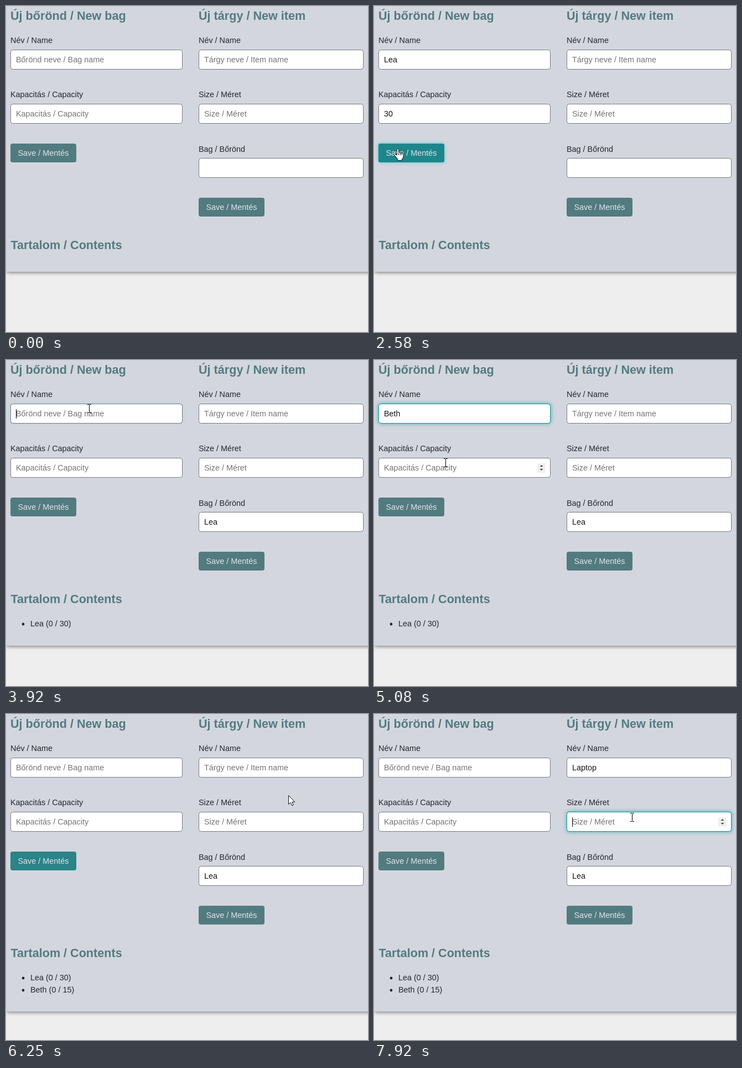
Recreate the animation shown at these times as an HTML page with a canvas. Size 654 px wide and 590 px high, loop 8 s.

```html
<!DOCTYPE html>
<html lang="hu">
<head>
<meta charset="utf-8">
<title>Bags and items</title>
<style>
  html, body { margin: 0; width: 100%; height: 100%; overflow: hidden; background: #eee; }
  canvas { display: block; width: 654px; height: 590px; }
</style>
</head>
<body>
<canvas id="stage" width="654" height="590"></canvas>
<script>
const ctx = document.getElementById('stage').getContext('2d');
const LOOP = 8000, FPS = 12;
const FAMILY = '"Liberation Sans", Arial, sans-serif';
const BODY = `14.4px ${FAMILY}`, HEAD = `bold 21.6px ${FAMILY}`;
const INK = '#23272d', TEAL = [82, 123, 128], BRIGHT = [30, 134, 139];
const BAG_A = 'Lea', BAG_B = 'Beth';
const SAVED_A = 2670, SAVED_B = 5920;

// One visit to a field: focus span, reset time, and typing
const visit = (from, to, clear, text = '', start = 0, step = 0) =>
  ({ from, to, clear, text, start, step });

const fields = [
  { x: 8, y: 79, w: 311, label: 'Név / Name', hint: 'Bőrönd neve / Bag name', visits: [
    visit(660, 2050, SAVED_A, BAG_A, 1400, 140),
    visit(3900, 5200, SAVED_B, BAG_B, 4100, 143)] },
  { x: 8, y: 177, w: 311, label: 'Kapacitás / Capacity', hint: 'Kapacitás / Capacity', number: true, visits: [
    visit(2050, 2420, SAVED_A, '30', 2190, 110),
    visit(5200, 5800, SAVED_B, '15', 5390, 120)] },
  { x: 348, y: 79, w: 298, label: 'Név / Name', hint: 'Tárgy neve / Item name', visits: [
    visit(6540, 7740, LOOP, 'Laptop', 6790, 115)] },
  { x: 348, y: 177, w: 298, label: 'Size / Méret', hint: 'Size / Méret', number: true, visits: [
    visit(7740, LOOP, LOOP)] }
];

const buttons = [
  { x: 8, y: 249, hovers: [[2330, 2860], [5690, 6210]], presses: [[2410, 2700], [5790, 5940]] },
  { x: 348, y: 347, hovers: [], presses: [] }
];

// Pointer path: time, x, y
const path = [
  [480, 215, -20], [640, 149, 87], [1750, 149, 87], [1950, 122, 190],
  [2250, 122, 190], [2420, 43, 258], [2800, 43, 258], [3400, 438, 277],
  [3560, 438, 277], [3860, 150, 88], [4880, 150, 88], [5080, 129, 186],
  [5560, 129, 186], [5740, 43, 258], [6160, 43, 258], [6250, 510, 147],
  [6430, 466, 90], [7400, 466, 90], [7640, 466, 187], [LOOP, 466, 187]
];

const clamp = v => Math.max(0, Math.min(1, v));
const fade = (t, from, to) => clamp((t - from) / 150) - clamp((t - to) / 150);
const fadeAny = (t, spans) => Math.max(0, ...spans.map(([a, b]) => fade(t, a, b)));
const mix = (a, b, k) => `rgb(${a.map((v, i) => Math.round(v + (b[i] - v) * k))})`;
const inside = (p, x, y, w, h) => p && p.x >= x && p.x < x + w && p.y >= y && p.y < y + h;

function pointerAt(t) {
  if (t < path[0][0]) return null;
  const i = path.findIndex(k => k[0] > t);
  const [t0, x0, y0] = path[i - 1], [t1, x1, y1] = path[i];
  const u = (t - t0) / (t1 - t0), e = u * u * (3 - 2 * u);
  return { x: Math.round(x0 + (x1 - x0) * e), y: Math.round(y0 + (y1 - y0) * e) };
}

function text(str, x, y, color = INK, font = BODY) {
  ctx.font = font;
  ctx.fillStyle = color;
  ctx.fillText(str, x, y);
}

function box(x, y, w, h, r, fill, stroke) {
  ctx.beginPath();
  ctx.roundRect(x, y, w, h, r);
  ctx.fillStyle = fill;
  ctx.fill();
  if (stroke) {
    ctx.strokeStyle = stroke;
    ctx.lineWidth = 1;
    ctx.stroke();
  }
}

function shadowed(color, blur, dx, dy, draw) {
  ctx.save();
  ctx.shadowColor = color;
  ctx.shadowBlur = blur;
  ctx.shadowOffsetX = dx;
  ctx.shadowOffsetY = dy;
  draw();
  ctx.restore();
}

function polygon(points, fill, stroke) {
  ctx.beginPath();
  points.forEach(([x, y]) => ctx.lineTo(x, y));
  ctx.closePath();
  ctx.fillStyle = fill;
  ctx.fill();
  if (stroke) {
    ctx.strokeStyle = stroke;
    ctx.stroke();
  }
}

function inputBox(x, y, w, glow) {
  const draw = () => box(x + .5, y + .5, w - 1, 35, 4, '#fff', mix([116, 123, 132], [28, 148, 150], glow));
  if (glow > 0) shadowed(`rgba(20,165,172,${.8 * glow})`, 6, 0, 0, draw);
  draw();
}

function spinner(x, y) {
  box(x - 7, y - 8, 15, 17, 1, '#f0f0f0');
  for (const s of [-1, 1])
    polygon([[x - 2.5, y + s * 2], [x + 3.5, y + s * 2], [x + .5, y + s * 5]], '#444');
}

function drawField(f, t, p) {
  const spans = f.visits.map(v => [v.from, v.to]);
  inputBox(f.x, f.y, f.w, fadeAny(t, spans));
  text(f.label, f.x, f.y - 12);

  const v = f.visits.find(v => t >= v.from && t < v.clear);
  const typed = v && v.text && t >= v.start
    ? Math.min(v.text.length, Math.floor((t - v.start) / v.step) + 1) : 0;
  const value = typed ? v.text.slice(0, typed) : '';
  text(value || f.hint, f.x + 10, f.y + 23, value ? '#14171b' : '#757575');

  const focused = v && t < v.to;
  if (focused) {
    const last = typed ? v.start + (typed - 1) * v.step : v.from;
    if ((t - last) % 1000 < 500) {
      ctx.fillStyle = '#000';
      ctx.fillRect(Math.round(f.x + 10 + ctx.measureText(value).width), f.y + 10, 1, 17);
    }
  }
  if (f.number && (focused || inside(p, f.x, f.y, f.w, 36))) spinner(f.x + f.w - 17, f.y + 18);
}

function drawButton(b, t) {
  const color = mix(TEAL, BRIGHT, fadeAny(t, b.hovers));
  const press = fadeAny(t, b.presses);
  const draw = () => box(b.x, b.y, 119, 34, 4, color);
  if (press > 0) shadowed(`rgba(40,200,215,${.75 * press})`, 6, 0, 0, draw);
  draw();
  text('Save / Mentés', b.x + 13.5, b.y + 22, '#dfe5e9');
}

function drawBeam() {
  ctx.fillStyle = '#000';
  ctx.fillRect(0, -7, 1, 14);
  for (const y of [-8, 7]) {
    ctx.fillRect(-3, y, 3, 1);
    ctx.fillRect(1, y, 3, 1);
  }
}

function drawArrow() {
  polygon([[.5, .5], [.5, 16.5], [4.2, 13.2], [6.7, 18.8], [9.2, 17.7], [6.8, 12.2], [11.8, 12.2]], '#fff', '#111');
}

function drawHand() {
  ctx.beginPath();
  ctx.moveTo(-1.5, 12);
  ctx.lineTo(-1.5, 1.5);
  ctx.quadraticCurveTo(0, -1.5, 1.5, 1.5);
  ctx.lineTo(1.5, 7);
  for (const x of [1.5, 4.5, 7.5]) ctx.quadraticCurveTo(x + 2, 5.5 + x / 5, x + 3, 8 + x / 5);
  ctx.lineTo(10, 15);
  ctx.quadraticCurveTo(9, 18, 7.5, 19);
  ctx.lineTo(7.5, 21.5);
  ctx.lineTo(-.5, 21.5);
  ctx.lineTo(-.5, 19);
  ctx.lineTo(-5.5, 12.5);
  ctx.quadraticCurveTo(-5, 9, -1.5, 12);
  ctx.closePath();
  ctx.fillStyle = '#fff';
  ctx.fill();
  ctx.strokeStyle = '#111';
  ctx.stroke();
  ctx.beginPath();
  for (const x of [1.5, 4.5, 7.3]) {
    ctx.moveTo(x, 8);
    ctx.lineTo(x, 12);
  }
  ctx.stroke();
}

function drawPointer(p) {
  if (!p) return;
  const overText = fields.some(f => inside(p, f.x, f.y, f.w, 36));
  const overButton = buttons.some(b => inside(p, b.x, b.y, 119, 34));
  ctx.save();
  ctx.translate(p.x, p.y);
  ctx.lineWidth = 1;
  (overText ? drawBeam : overButton ? drawHand : drawArrow)();
  ctx.restore();
}

function render(t) {
  const bags = [];
  if (t >= SAVED_A) bags.push(`${BAG_A} (0 / 30)`);
  if (t >= SAVED_B) bags.push(`${BAG_B} (0 / 15)`);
  const bottom = [481, 517, 538.5][bags.length];
  const p = pointerAt(t);

  ctx.fillStyle = '#eee';
  ctx.fillRect(0, 0, 654, 590);
  shadowed('rgba(0,0,0,.45)', 6, 2, 2, () => box(-2, -20, 680, bottom + 20, 5, '#d3d6de'));

  const title = mix(TEAL, TEAL, 0);
  text('Új bőrönd / New bag', 8, 25, title, HEAD);
  text('Új tárgy / New item', 348, 25, title, HEAD);
  text('Tartalom / Contents', 8.5, 440, title, HEAD);

  fields.forEach(f => drawField(f, t, p));
  text('Bag / Bőrönd', 348, 264);
  inputBox(348, 275, 298, 0);
  if (bags.length) text(BAG_A, 358, 298, '#14171b');
  buttons.forEach(b => drawButton(b, t));

  bags.forEach((bag, i) => {
    const y = 482 + i * 22;
    ctx.beginPath();
    ctx.arc(31, y - 4, 2.4, 0, 7);
    ctx.fillStyle = INK;
    ctx.fill();
    text(bag, 44, y);
  });
  drawPointer(p);
}

const began = performance.now();
function tick() {
  const t = (performance.now() - began) % LOOP;
  const step = Math.min(LOOP * FPS / 1000 - 1, Math.floor((t + 4) * FPS / 1000));
  render(step * 1000 / FPS);
  requestAnimationFrame(tick);
}
tick();
</script>
</body>
</html>
```
